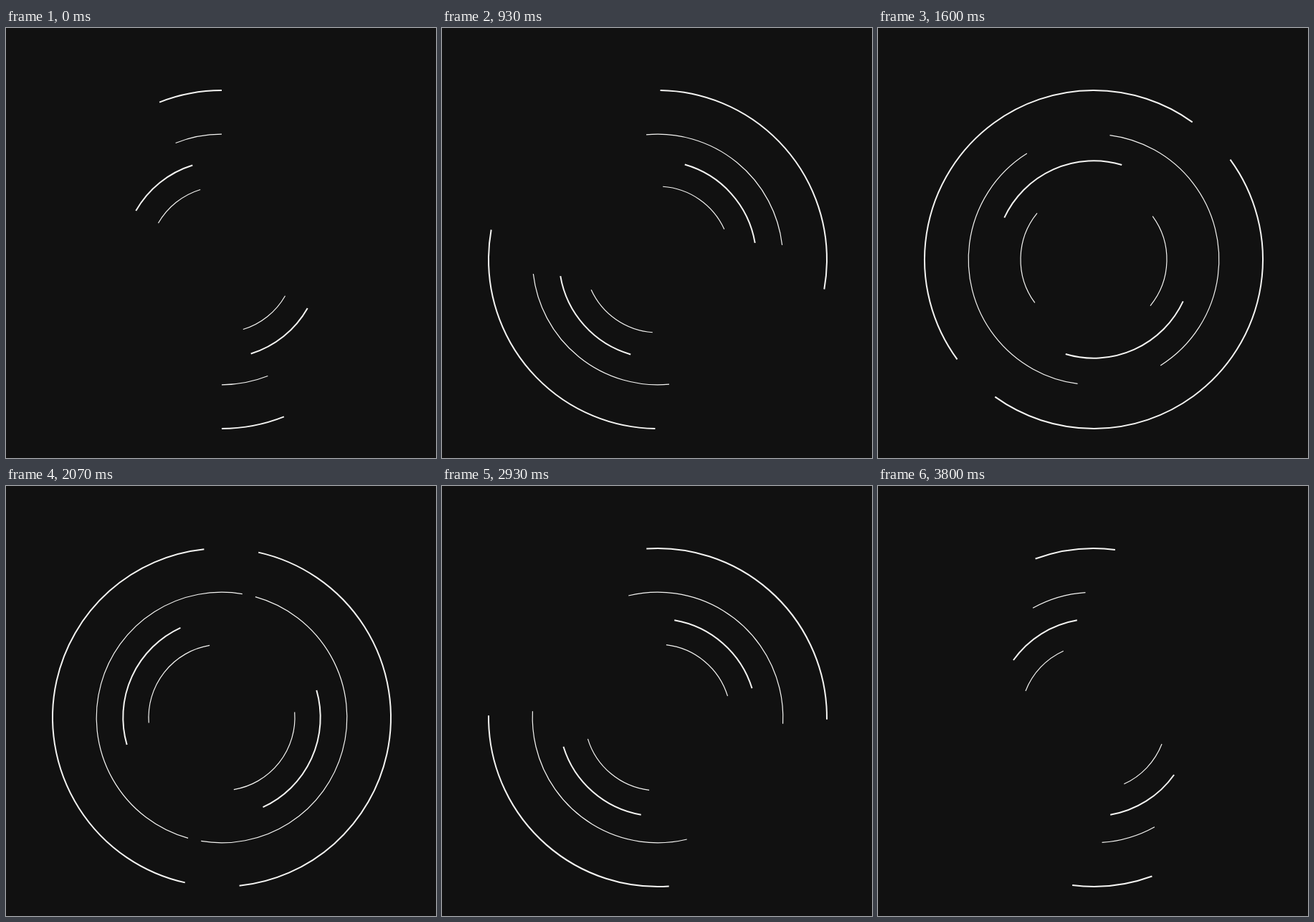
Animation, 600 px wide and 600 px high, one loop 3.83 s. Source, as an HTML page with a canvas:

```html
<!DOCTYPE html>
<html lang="en">
<head>
<meta charset="utf-8">
<title>Rotating arcs</title>
<style>
  html, body { margin: 0; height: 100%; overflow: hidden; background: #111; }
  canvas { display: block; }
</style>
</head>
<body>
<canvas id="stage" width="600" height="600"></canvas>
<script>
const ctx = document.getElementById('stage').getContext('2d');
const LOOP = 3830;
const RAD = Math.PI / 180;

// Angles run clockwise from the top; each ring is a pair of opposite arcs.
// head: fixed-end angle, min/max: arc length, peak: step of the longest arc,
// delay: steps before growth begins, turn: degrees per step.
const rings = [
  { r: 236,   width: 2,   head: 0,   min: 21.6, max: 180,  peak: 43, delay: 0.92, turn: -360 / 95, turnDelay: 0.92 },
  { r: 174.8, width: 1.2, head: 0,   min: 21.6, max: 180,  peak: 52, delay: 0,    turn: 360 / 95,  turnDelay: 0 },
  { r: 137.7, width: 2,   head: -17.2, min: 43.2, max: 86.4, peak: 43, delay: 0.92, turn: -3.75,   turnDelay: 0 },
  { r: 102,   width: 1.2, head: -17, min: 43.2, max: 86.4, peak: 52, delay: 0,    turn: 3.75,      turnDelay: 0 }
];

// 25 poses per second shown on a 30 per second clock, after a short hold.
function stepAt(ms) {
  const tick = Math.floor((ms + 4) * 0.03);
  return tick < 3 ? 0 : Math.floor(tick * 5 / 6) - 1;
}

function drawRing(ring, step) {
  const x = Math.max(0, step - ring.delay);
  const grow = x < ring.peak ? x / ring.peak : (95 - x) / (95 - ring.peak);
  const length = ring.min + (ring.max - ring.min) * grow;
  const end = ring.head + ring.turn * Math.max(0, step - ring.turnDelay);
  ctx.lineWidth = ring.width;
  for (const flip of [-90, 90]) {
    ctx.beginPath();
    ctx.arc(301, 323, ring.r, (end - length + flip) * RAD, (end + flip) * RAD);
    ctx.stroke();
  }
}

function draw() {
  const step = stepAt(performance.now() % LOOP);
  ctx.fillStyle = '#111';
  ctx.fillRect(0, 0, 600, 600);
  ctx.strokeStyle = '#f4f4f2';
  for (const ring of rings) drawRing(ring, step);
  requestAnimationFrame(draw);
}
draw();
</script>
</body>
</html>
```
